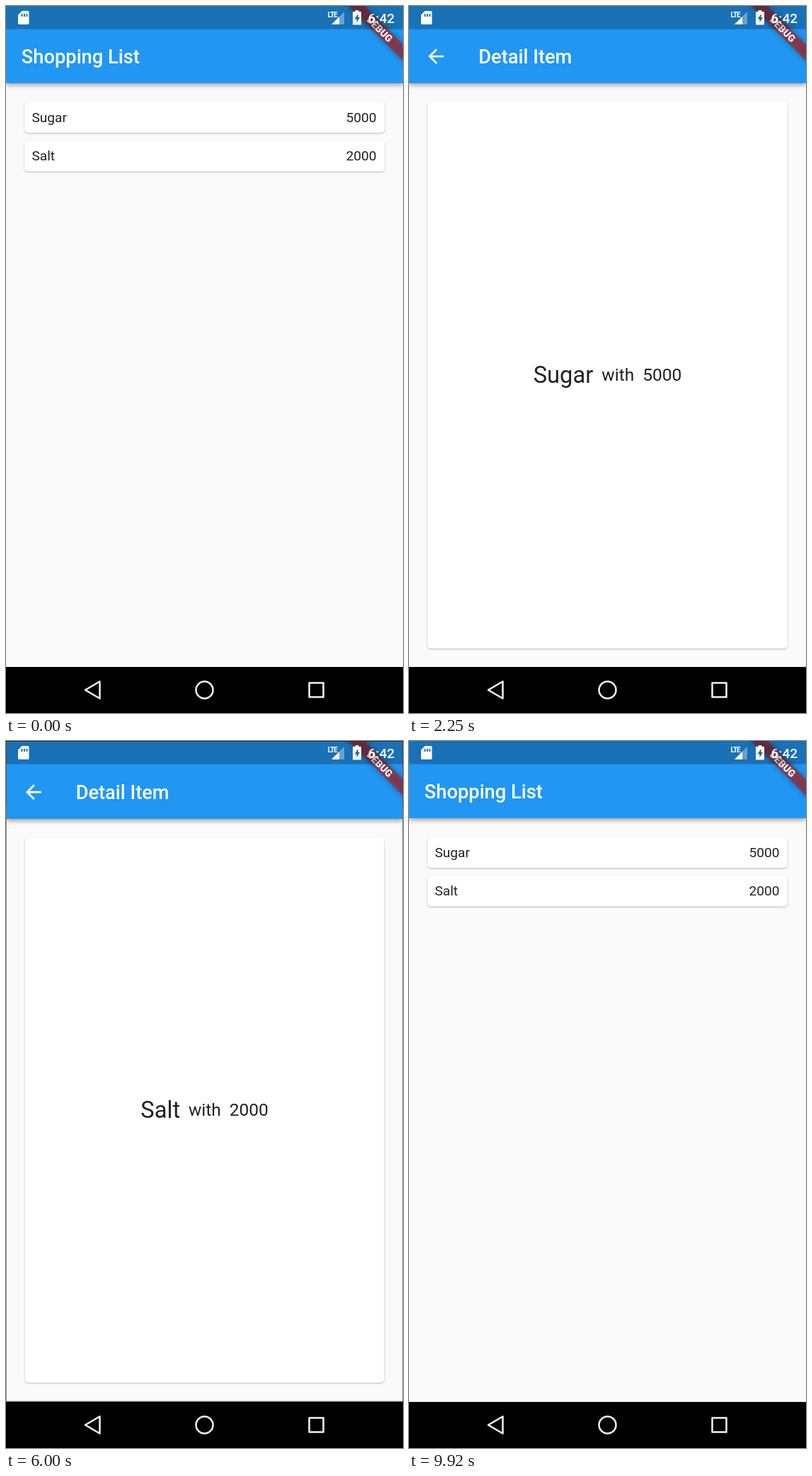
An HTML page that plays this animation: 561 px wide and 998 px high, repeating every 9.96 s.

```html
<!DOCTYPE html>
<html lang="en">
<head>
<meta charset="utf-8">
<title>Shopping List</title>
<style>
  html, body { margin: 0; width: 100%; height: 100%; overflow: hidden; background: #000; }
  svg { display: block; width: 561px; height: 998px; font: 19.1px Roboto, sans-serif; }
  .page { fill: #fafafa; }
  .bar { fill: #2196f3; filter: drop-shadow(0 3px 3px rgba(0, 0, 0, .35)); }
  .card { fill: #fff; filter: drop-shadow(0 1px 1px rgba(0, 0, 0, .28)); }
  .title { font-size: 27.27px; font-weight: 500; fill: #fff; }
  .ink { fill: #212121; }
  .end { text-anchor: end; }
  .banner { fill: rgba(183, 28, 28, .63); filter: drop-shadow(0 0 4px rgba(0, 0, 0, .5)); }
</style>
</head>
<body>
<svg viewBox="0 0 561 998">
  <clipPath id="barClip"><rect width="561" height="109"/></clipPath>

  <g id="list">
    <rect class="page" width="561" height="933"/>
    <rect class="bar" width="561" height="109"/>
    <text class="title" x="21.8" y="80.7">Shopping List</text>
    <rect class="card" x="26" y="135" width="509" height="44" rx="5"/>
    <rect class="card" x="26" y="189.5" width="509" height="44" rx="5"/>
    <g class="ink">
      <text x="36.5" y="163.8">Sugar</text><text class="end" x="523.5" y="163.8">5000</text>
      <text x="36.5" y="218.4">Salt</text><text class="end" x="523.5" y="218.4">2000</text>
    </g>
  </g>

  <rect id="scrim" width="561" height="933"/>

  <g id="detail">
    <rect class="page" width="561" height="933"/>
    <rect class="bar" width="561" height="109"/>
    <circle id="ripple" cx="38.2" cy="71" fill="#c8c8c8" clip-path="url(#barClip)"/>
    <path fill="#fff" transform="translate(21.8 54.7) scale(1.3635)"
      d="M20 11H7.83l5.59-5.59L12 4l-8 8 8 8 1.41-1.41L7.83 13H20z"/>
    <text class="title" x="98.2" y="80.7">Detail Item</text>
    <rect class="card" x="26" y="135" width="509" height="772" rx="5"/>
    <text class="ink" x="280.5" y="532" text-anchor="middle" font-size="24.5"><tspan id="name" font-size="32.7"></tspan><tspan dx="12" dy="-2.8">with</tspan><tspan id="price" dx="12"></tspan></text>
  </g>

  <g transform="translate(561 0) rotate(45)">
    <rect class="banner" x="-60" y="38.2" width="120" height="16.4"/>
    <text y="51.3" text-anchor="middle" font-size="13.9" font-weight="900" fill="#fff">DEBUG</text>
  </g>

  <rect width="561" height="32.7" opacity=".25"/>
  <g fill="#fff">
    <path fill-rule="evenodd" d="M22.5 7H31q1.5 0 1.5 1.5v16Q32.500 26 31 26H18.500Q17 26 17 24.500V12.500z
      M21.500 11v4h2v-4z M25 11v4h2v-4z M28.500 11v4h2v-4z"/>
    <text x="454.500" y="15.500" font-size="10" font-weight="700" letter-spacing="-1">LTE</text>
    <path opacity=".35" d="M478 8V26H460z"/>
    <path d="M471 15V26H460z"/>
    <path fill-rule="evenodd" d="M493.500 6h5v2h3.500v18.500h-12V8h3.500z M497.500 11l-5 7.500h3v5l4.500-7.500h-2.500z"/>
    <text x="511.500" y="23.700" font-weight="500">6:42</text>
  </g>

  <rect y="933" width="561" height="65"/>
  <g fill="none" stroke="#f4f4f4" stroke-width="2.5" stroke-linejoin="round">
    <path d="M112 965.500L132.500 953.500V977.500z"/>
    <circle cx="280.500" cy="965.500" r="12"/>
    <rect x="428.500" y="955.500" width="20" height="20"/>
  </g>
</svg>
<script>
const LOOP = 9960, TRANSITION = 300, PRESS_LEAD = 130;
const visits = [
  { open: 1550, close: 4350, name: 'Sugar', price: '5000' },
  { open: 5800, close: 7580, name: 'Salt', price: '2000' },
];
const el = id => document.getElementById(id);
const [list, scrim, detail, ripple, nameText, priceText] =
  ['list', 'scrim', 'detail', 'ripple', 'name', 'price'].map(el);

const clamp = v => Math.min(1, Math.max(0, v));
const interval = (t, from, to) => clamp((t - from) / (to - from));
const mix = (a, b, k) => a + (b - a) * k;

function cubic(x1, y1, x2, y2, x) {
  const at = (a, b, s) => 3 * (1 - s) ** 2 * s * a + 3 * (1 - s) * s * s * b + s ** 3;
  let lo = 0, hi = 1;
  for (let i = 0; i < 24; i++) {
    const mid = (lo + hi) / 2;
    if (at(x1, x2, mid) < x) lo = mid; else hi = mid;
  }
  return at(y1, y2, lo);
}

// Fast start up to 40 %, then a very slow settle
function ease(t) {
  if (t <= 0 || t >= 1) return clamp(t);
  return t < 1 / 6
    ? .4 * cubic(.05, 0, .133333, .06, t * 6)
    : .4 + .6 * cubic(.208333, .82, .25, 1, (t - 1 / 6) * 1.2);
}

function zoom(page, s) {
  page.setAttribute('transform', `translate(${280.5 * (1 - s)} ${466.5 * (1 - s)}) scale(${s})`);
}

function render(now) {
  const time = now % LOOP;
  const visit = visits.find(v => time < v.close + TRANSITION) || visits[0];
  const closing = time >= visit.close && time < visit.close + TRANSITION;
  const t = clamp((time - (closing ? visit.close : visit.open)) / TRANSITION);
  const shown = time >= visit.open && time < visit.close + TRANSITION;
  const k = ease(t);

  zoom(list, !shown ? 1 : closing ? mix(1.1, 1, k) : mix(1, 1.05, k));
  zoom(detail, closing ? mix(1, .9, k) : mix(.85, 1, k));
  detail.setAttribute('opacity', !shown ? 0
    : closing ? 1 - interval(t, .0825, .2075) : interval(t, .125, .25));
  scrim.setAttribute('opacity', shown && !closing ? .6 * interval(t, .2075, .4175) : 0);

  const press = clamp((time - visit.close + PRESS_LEAD) / 170);
  ripple.setAttribute('r', 47 * press);
  ripple.setAttribute('opacity', .4 * clamp(press * 3));
  nameText.textContent = visit.name;
  priceText.textContent = visit.price;
}

const start = performance.now();
(function frame() {
  render(performance.now() - start);
  requestAnimationFrame(frame);
})();
</script>
</body>
</html>
```
